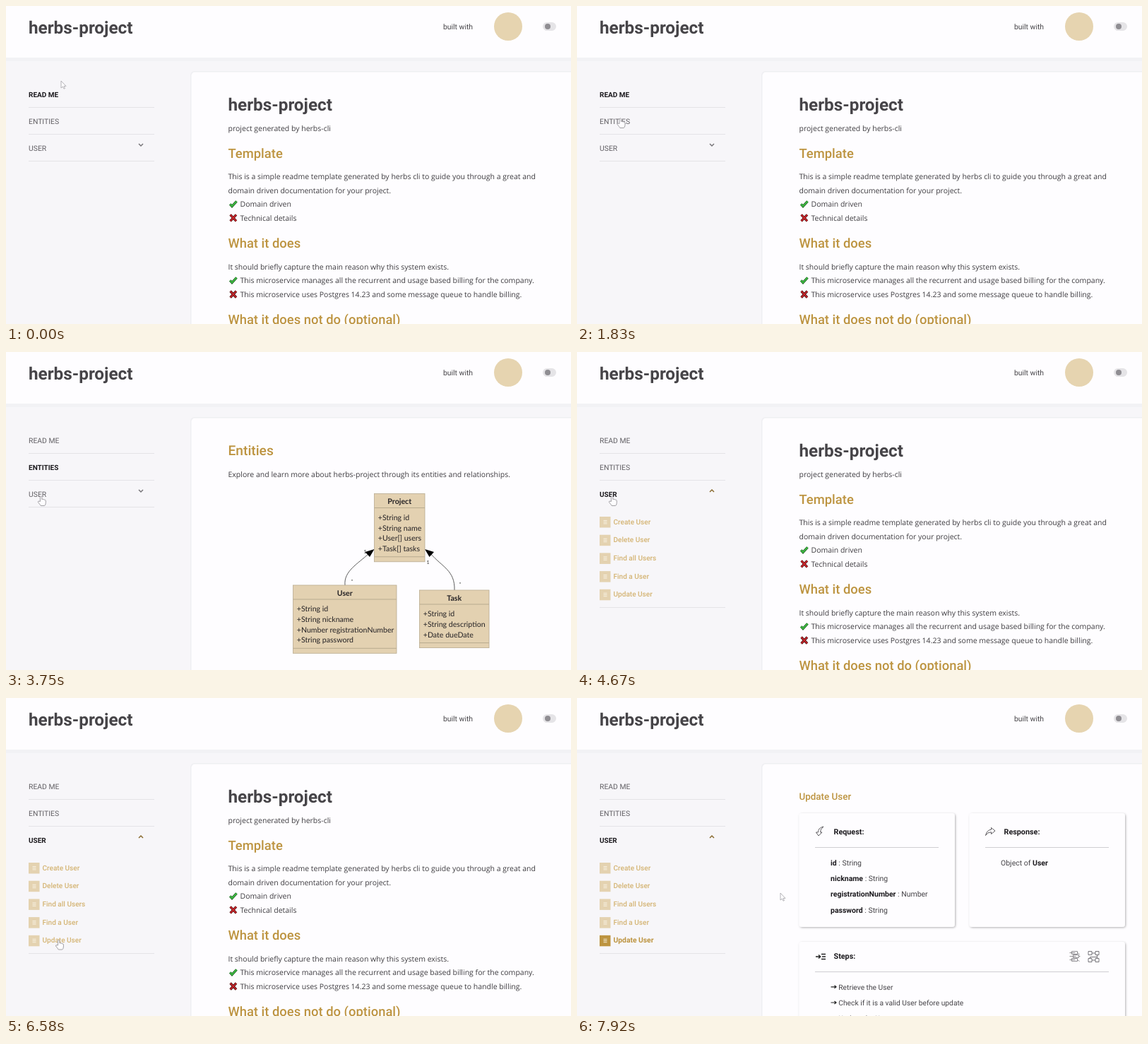
These frames come from a looping animation (800 by 450 pixels, 8 s). An HTML page:

```html
<!DOCTYPE html>
<html lang="en">
<head>
<meta charset="utf-8">
<title>herbs-project</title>
<style>
html, body { margin: 0; width: 100%; height: 100%; overflow: hidden; background: #f7f6f9; }
svg { display: block; width: 800px; height: 450px; text-rendering: geometricPrecision; font-family: Roboto, sans-serif; }
.body { font-family: "Open Sans", sans-serif; }
.uml { font-family: Lato, sans-serif; }
</style>
</head>
<body>
<svg id="stage" viewBox="0 0 800 450">
  <defs>
    <filter id="soft" x="-10%" y="-10%" width="120%" height="120%">
      <feDropShadow dx="1" dy="1" stdDeviation="1.6" flood-color="#000" flood-opacity=".3"/>
    </filter>
  </defs>
  <rect width="800" height="450" fill="#f7f6f9"/>
  <rect y="73" width="800" height="5" fill="#f2f2f5"/>
  <rect width="800" height="73" fill="#fefdff"/>
  <rect x="261" y="92" width="545" height="370" rx="6" fill="#efeff2"/>
  <rect x="262.5" y="93.5" width="545" height="370" rx="5" fill="#fefdff"/>
  <circle cx="711" cy="29" r="20" fill="#e6d4b0"/>
  <rect x="760" y="23" width="19" height="12" rx="6" fill="#e5e4e7"/>
  <circle cx="767" cy="29" r="4" fill="#8f8d92"/>
  <g id="head"></g>
  <g id="menu"></g>
  <g id="page"></g>
  <g id="cursor" fill="#fefdff" stroke-width=".8" stroke-linejoin="round">
    <path id="arrow" stroke="#a3a1a6" d="M0 0V10L2.4 8L4 11.2L5.5 10.5L4 7.4H7Z"/>
    <path id="hand" stroke="#8b898e" d="M-1.2 8V1.2Q0 -.6 1.2 1.2V5Q2.3 4.2 3.2 5.3Q4.3 4.6 5.1 5.8Q6.4 5.4 6.7 7V10Q6.5 13 5 14H-.4Q-1.6 12.2 -4.2 9Q-4.4 7.3 -2.6 7.6Z"/>
  </g>
</svg>
<script>
const $ = id => document.getElementById(id);
const INK = '#464448', GREY = '#626065', GOLD = '#bd9440', PALE = '#d4b473', BLACK = '#1d1b1f';

const text = (x, y, s, size, fill = INK, weight = 400, attrs = '') =>
  `<text x="${x}" y="${y}" font-size="${size}" fill="${fill}" font-weight="${weight}" ${attrs}>${s}</text>`;
const body = (x, y, s) => text(x, y, s, 10.5, '#3e3c40', 400, 'class="body"');
const line = (x1, x2, y, color = '#e4e3e7') =>
  `<path d="M${x1} ${y}H${x2}" stroke="${color}"/>`;
const icon = (x, y, d, color = '#4c4a4e', width = 1) =>
  `<path transform="translate(${x} ${y})" d="${d}" fill="none" stroke="${color}" stroke-width="${width}"/>`;

const item = (y, ok, s) => {
  const d = ok ? 'M1.2 6L4 9L10.5 2' : 'M1.6 1.3L10 10.3M10 1.3L1.6 10.3';
  return icon(316, y - 10, d, ok ? '#1c5a20' : '#4a1214', 3.4) +
    icon(316, y - 10, d, ok ? '#3fc043' : '#cf262b', 1.8) + body(331.5, y, s);
};
const title = (y, s) => text(314.5, y, s, 18.4, GOLD, 500);

const readme = [
  text(314.5, 147.5, 'herbs-project', 24.3, INK, 700),
  body(314.5, 176.6, 'project generated by herbs-cli'),
  title(214.5, 'Template'),
  body(314.5, 245, 'This is a simple readme template generated by herbs cli to guide you through a great and'),
  body(314.5, 264.8, 'domain driven documentation for your project.'),
  item(284.4, true, 'Domain driven'),
  item(304.1, false, 'Technical details'),
  title(341.8, 'What it does'),
  body(314.5, 372.6, 'It should briefly capture the main reason why this system exists.'),
  item(392.4, true, 'This microservice manages all the recurrent and usage based billing for the company.'),
  item(412.2, false, 'This microservice uses Postgres 14.23 and some message queue to handle billing.'),
  title(449.5, 'What it does not do (optional)')
].join('');

// One class box of the entity diagram
function entity(x, y, w, name, fields) {
  const h = 37.5 + fields.length * 14.7;
  const label = (dx, dy, s, more) => text(x + dx, y + dy, s, 10.6, '#252225', 400, 'class="uml" ' + more);
  return `<rect x="${x}" y="${y}" width="${w}" height="${h}" fill="#e3d1b1" stroke="#b8ab8f" stroke-width=".8"/>` +
    line(x, x + w, y + 20, '#b8ab8f') + line(x, x + w, y + h - 7, '#b8ab8f') +
    label(w / 2, 14.7, name, 'text-anchor="middle" style="font-weight:700"') +
    fields.map((f, i) => label(5.3, 37.3 + i * 14.7, '+' + f, '')).join('');
}
const mark = (x, y, s) => text(x, y, s, 7, '#333', 400, 'class="uml"');

const entities = [
  text(314.5, 145.8, 'Entities', 19.2, GOLD, 500),
  body(314.5, 176.6, 'Explore and learn more about herbs-project through its entities and relationships.'),
  icon(0, 0, 'M480 330C478 310 498 300 514 285M635 337C636 309 617 304 601 285', '#4a4a4a', .9),
  '<path d="M521.5 279L508.5 283L515 290ZM593 279L606 283L599.5 290Z"/>',
  entity(521.5, 200.5, 71.5, 'Project', ['String id', 'String name', 'User[] users', 'Task[] tasks']),
  entity(406.5, 330, 146.5, 'User', ['String id', 'String nickname', 'Number registrationNumber', 'String password']),
  entity(585.5, 337, 98.5, 'Task', ['String id', 'String description', 'Date dueDate']),
  mark(506.5, 285, '1'), mark(488.5, 327, '*'), mark(595.5, 300, '1'), mark(641.5, 331, '*')
].join('');

const card = (x, y, w, h, name, top = 30) =>
  `<rect x="${x}" y="${y}" width="${w}" height="${h}" rx="4" fill="#fefdff" filter="url(#soft)"/>` +
  text(x + 49, y + top, name, 10.8, BLACK, 700) + line(x + 22.5, x + w - 23, y + top + 18.5, '#cfced2');
const field = (y, name, type) =>
  text(359, y, `<tspan font-weight="700" fill="${BLACK}">${name}</tspan> : ${type}`, 10.5);
const step = (y, s) => icon(359.5, y - 4, 'M0 0H7M5 -2L7.5 0L5 2', '#222', 1.2) + text(370.3, y, s, 10.25);
const flow = 'M0 2H8M0 7H9M0 12H8M3 0H11V4H3ZM5 5H13V9H5ZM3 10H11V14H3ZM11 2L14 4M13 7H15M11 12L14 14';
const boxes = 'M0 0H5V5H0ZM10 0H15V5H10ZM0 10H5V15H0ZM10 10H15V15H10ZM5 2.5H10M12.5 5V10M10 12.5H5M2.5 8V10M2.5 8H12';

const update = [
  text(314.5, 143.8, 'Update User', 13.4, GOLD, 500),
  card(314.5, 163, 220.5, 161, 'Request:'),
  card(555.5, 163, 220.5, 161, 'Response:'),
  card(314.5, 345, 461.5, 120, 'Steps:', 24),
  icon(338, 182, 'M11 0Q3 2 3.5 8H.5L4 13L9 8H6.5Q6 4 11 0Z', '#4c4a4e', .9),
  icon(578.5, 182.5, 'M0 12Q2 4 8 3.8V1L13.5 5.5L8 10V7.2Q3 7 0 12Z', '#4c4a4e', .9),
  icon(338, 361, 'M0 5H6M4 2.5L6.7 5L4 7.5M8 1.5H14M9 5H14M8 8.5H14', '#222', 1.4),
  icon(697.5, 358.5, flow, '#77757a', .8),
  icon(724, 358.5, boxes, '#68666b', .9),
  field(237, 'id', 'String'),
  field(259.2, 'nickname', 'String'),
  field(281.4, 'registrationNumber', 'Number'),
  field(303.6, 'password', 'String'),
  text(600, 237, `Object of <tspan font-weight="700" fill="${BLACK}">User</tspan>`, 10.5),
  step(412.8, 'Retrieve the User'),
  step(435, 'Check if it is a valid User before update'),
  step(457.2, 'Update the User')
].join('');

const useCases = ['Create User', 'Delete User', 'Find all Users', 'Find a User', 'Update User'];

function menu(active, open, chosen) {
  let out = ['READ ME', 'ENTITIES', 'USER'].map((s, i) =>
    text(32, 129 + i * 38, s, i === active ? 10 : 10.4, i === active ? BLACK : GREY, i === active ? 700 : 400)).join('');
  out += line(32, 210, 143.5) + line(32, 210, 181.5) + line(32, 210, open ? 361.5 : 219.5);
  out += icon(188, 195, open ? 'M0 3L3 0L6 3' : 'M0 0L3 3L6 0', open ? '#8a6c32' : '#77757a', 1.5);
  if (!open) return out;
  return out + useCases.map((s, i) => {
    const y = 233 + i * 25.7, on = i === chosen;
    return `<rect x="32" y="${y}" width="15.5" height="15.5" fill="${on ? GOLD : '#e4d2b0'}"/>` +
      icon(37.5, y + 5.5, 'M0 0H5M0 2.2H5M0 4.4H5', '#fbf5e8', .9) +
      text(51.5, y + 10.6, s, on ? 10.3 : 10.05, on ? GOLD : PALE, on ? 700 : 500);
  }).join('');
}

$('head').innerHTML = text(32, 38.5, 'herbs-project', 24.3, INK, 700) + text(619, 33, 'built with', 10.4, INK);

const scenes = [
  [0, menu(0), readme],
  [1915, menu(1), entities],
  [4245, menu(2, true), readme],
  [6745, menu(2, true, 4), update]
];

// Pointer stops: time, x, y
const stops = [
  [0, 78, 106], [700, 51, 150], [1000, 61.3, 158.5], [3200, 61.3, 158.5], [3740, 49.6, 203.5],
  [5200, 49.6, 203.5], [6330, 74.7, 342], [7585, 74.7, 342], [7915, 288, 276]
];

function pointer(t) {
  const i = stops.findIndex(s => s[0] > t);
  if (i < 0) return stops.at(-1).slice(1);
  const [a, b] = [stops[i - 1], stops[i]];
  const k = (t - a[0]) / (b[0] - a[0]), e = k * k * (3 - 2 * k);
  return [1, 2].map(n => a[n] + (b[n] - a[n]) * e);
}

const FRAME = 1000 / 12;
let shown;

function draw(now) {
  const t = Math.floor((now % 8000 + 5) / FRAME) * FRAME % 8000;
  const scene = scenes.findLast(s => s[0] <= t);
  if (scene !== shown) {
    shown = scene;
    $('menu').innerHTML = scene[1];
    $('page').innerHTML = scene[2];
  }
  const [x, y] = pointer(t), link = x < 112 && y > 114;
  $('cursor').setAttribute('transform', `translate(${x} ${y})`);
  $('hand').style.display = link ? '' : 'none';
  $('arrow').style.display = link ? 'none' : '';
  requestAnimationFrame(draw);
}
draw(0);
</script>
</body>
</html>
```
